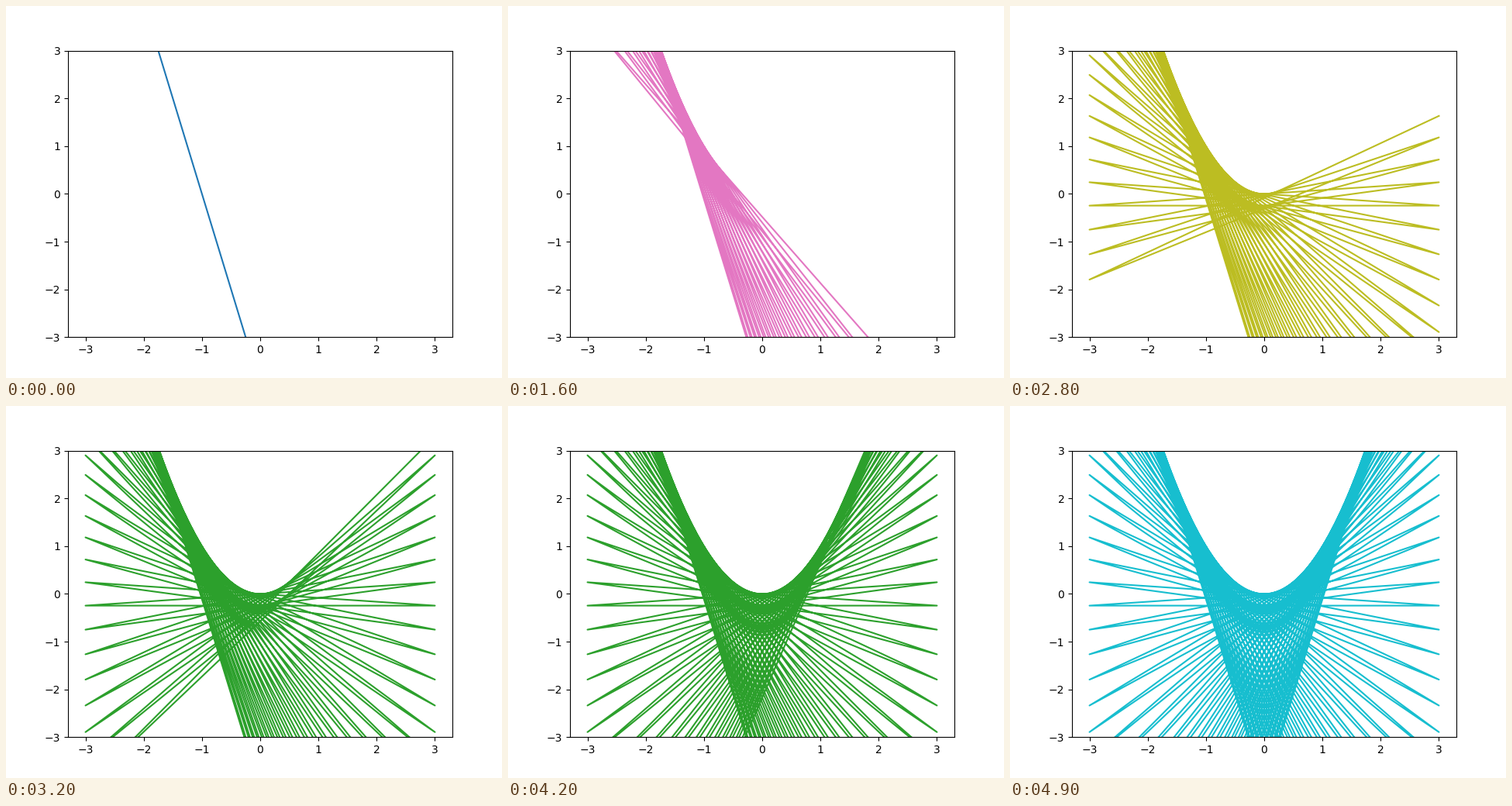
These frames come from a looping animation (640 by 480 pixels, 5 s). A matplotlib script:

```python
import numpy as np
import matplotlib.pyplot as plt
from matplotlib.animation import FuncAnimation

FRAMES = 50
INTERVAL = 100
HALF_WIDTH = 3

# Each tangent of y = x^2 at x = a is y = 2*a*x - a^2, drawn from left to right;
# one continuous stroke joins its right end to the left end of the next tangent.
touch = np.linspace(-2, 2, FRAMES)
ends = np.array([-HALF_WIDTH, HALF_WIDTH])
xs = np.tile(ends, FRAMES)
ys = (2 * np.outer(touch, ends) - touch[:, None] ** 2).ravel()

fig, ax = plt.subplots(figsize=(6.4, 4.8), dpi=100)
ax.set_xlim(-1.1 * HALF_WIDTH, 1.1 * HALF_WIDTH)
ax.set_ylim(-3, 3)
stroke, = ax.plot([], [])


def update(frame):
    count = 2 * (frame + 1)
    stroke.set_data(xs[:count], ys[:count])
    stroke.set_color(f"C{frame % 10}")
    return stroke,


anim = FuncAnimation(fig, update, frames=FRAMES, interval=INTERVAL, repeat=True)
plt.show()
```
